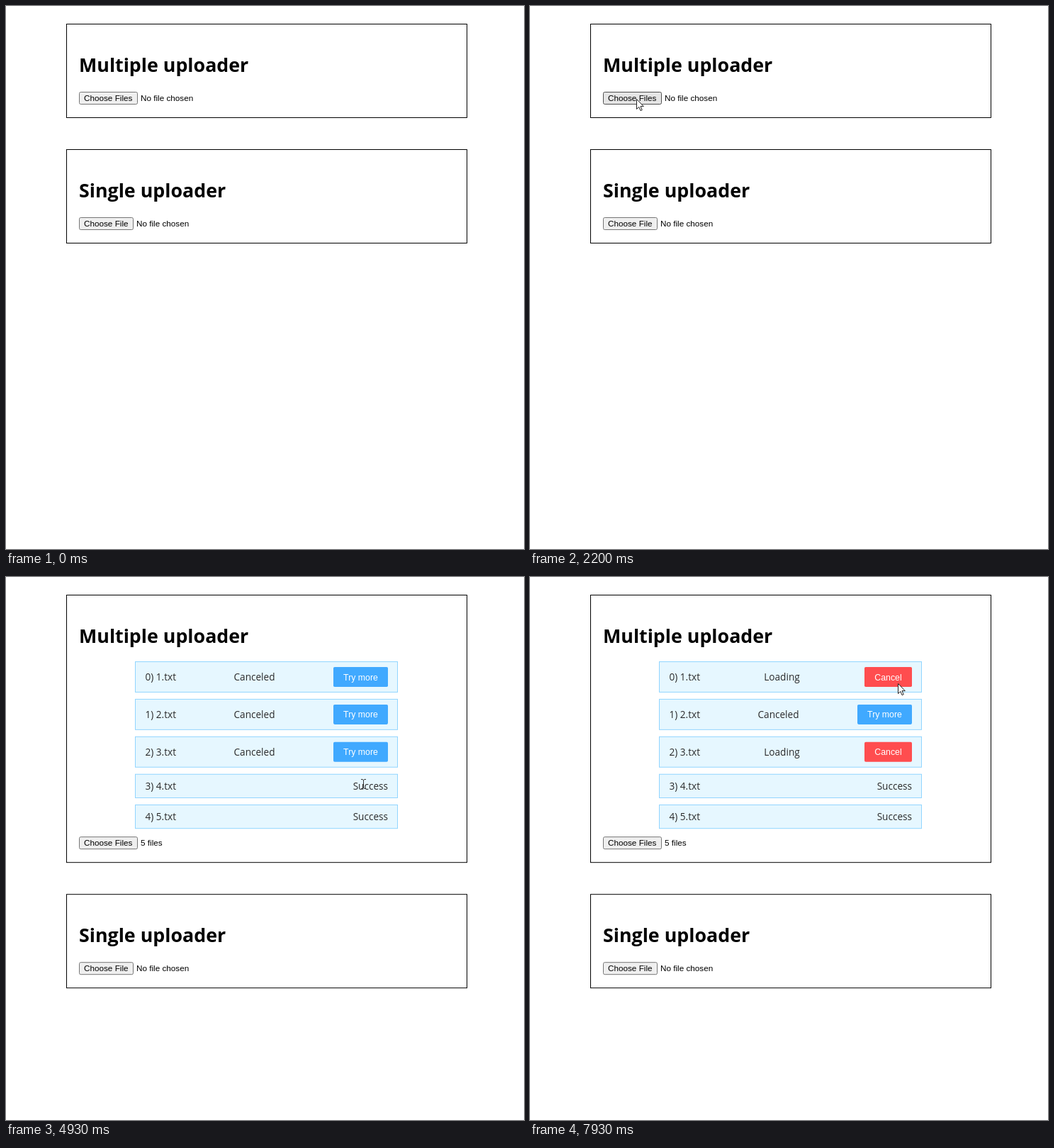
Write an HTML page that moves like this. It is 731 px wide and 766 px high and loops after 8 s.

```html
<!DOCTYPE html>
<html lang="en">
<head>
<meta charset="utf-8">
<title>File uploaders</title>
<style>
  html, body { margin: 0; width: 100%; height: 100%; overflow: hidden; background: #fff; }
  svg { display: block; width: 731px; height: 766px; font: 13.6px "Open Sans", "Noto Sans", sans-serif; fill: #2a2a2a; }
  .title { font-size: 26.8px; font-weight: 700; fill: #000; }
  .input { font: 11.73px "Liberation Sans", Arial, sans-serif; fill: #000; }
  .button { font: 12.32px "Liberation Sans", Arial, sans-serif; fill: #fff; text-anchor: middle; }
  .tip { font-size: 10.8px; fill: #1c3fc4; }
  .label { font-size: 9px; font-weight: 700; fill: #aaa; text-anchor: middle; }
</style>
</head>
<body>
<svg id="stage" viewBox="0 0 731 766"></svg>
<script>
const LOOP = 8000, STEP = 1000 / 15;
const ENTER = 1270, OVER = 1730, DROP = 2070, LISTED = 2870, DONE = 4870, LEAVE_TEXT = 5600;
const FILES = [0, 1, 2, 3, 4];
const SCALE = .882;   // page zoom, sets the list spacing

// Pointer moves: start, end, and the place reached; it rests in between
const entry = [640, 220];
const moves = [
  [1200, 1600, 191, 149], [1600, 1870, 138, 122], [2070, 2200, 150, 131],
  [2870, 3730, 510, 236], [3930, 4130, 500, 151], [4330, 4730, 504, 283],
  [4800, 5330, 505, 343], [5400, 5600, 504, 296], [5600, 6270, 508, 189],
  [6270, 6470, 504, 174], [6670, 6930, 507, 188], [7000, 7530, 517, 147],
  [7730, 7930, 519, 150]
];
// When each of the first files is canceled and retried
const canceled = [[4200, 7800], [4070, Infinity], [3930, 5930]];

const rect = (x, y, w, h, attrs) => `<rect x="${x}" y="${y}" width="${w}" height="${h}" ${attrs}/>`;
const text = (x, y, str, attrs = '') => `<text x="${x}" y="${y}" ${attrs}>${str}</text>`;

function pointerAt(t) {
  let [x, y] = entry;
  for (const [from, to, toX, toY] of moves) {
    const k = Math.max(0, Math.min(1, (t - from) / (to - from)));
    const eased = k * k * (3 - 2 * k);
    x += (toX - x) * eased;
    y += (toY - y) * eased;
  }
  return [Math.round(x), Math.round(y)];
}

function fileInput(y, caption, width, status, hover) {
  const look = hover ? 'fill="#e5e5e5" stroke="#4f4f4f"' : 'fill="#efefef" stroke="#767676"';
  return rect(103.5, y + .5, width - 1, 17, `rx="2" ${look}`) +
    text(110, y + 13, caption, 'class="input"') +
    text(107 + width, y + 13, status, 'class="input"');
}

function panel(y, height, title) {
  return rect(85.5, y + .5, 565, height, 'fill="#fff" stroke="#000"') +
    text(103, y + 68, title, 'class="title"');
}

function button(y, caption, width, color) {
  return rect(539 - width, y, width, 28, `rx="1.8" fill="${color}"`) +
    text(539 - width / 2, y + 18.5, caption, 'class="button"');
}

const isDone = (i, t) => i > 2 && t >= DONE;
const isCanceled = (i, t) => i < 3 && t >= canceled[i][0] && t < canceled[i][1];
const pitch = (i, t) => (isDone(i, t) ? 49 : 60) * SCALE;
const listHeight = (n, t) => FILES.slice(0, n).reduce((sum, i) => sum + pitch(i, t), 0);

function fileRow(i, t) {
  const y = 119 + listHeight(i, t);
  const height = pitch(i, t) - 10;
  const base = y + height / 2 + 5.7;
  const out = rect(182.5, y + .5, 370, height, 'fill="#e6f7ff" stroke="#91d5ff"') +
    text(196.5, base, `${i}) ${i + 1}.txt`);
  if (isDone(i, t)) return out + text(539, base, 'Success', 'text-anchor="end"');
  const [status, x, action, width, color] = isCanceled(i, t)
    ? ['Canceled', 350.5, 'Try more', 77, '#40a9ff']
    : ['Loading', 355.5, 'Cancel', 67, '#ff4d4f'];
  return out + text(x, base, status, 'text-anchor="middle"') + button(y + 8, action, width, color);
}

function dragImage() {
  let lines = '';
  for (let y = 7; y < 34; y += 3) lines += `M4 ${y}H${y < 10 ? 18 : 25}`;
  return FILES.map(i =>
    `<g transform="translate(${i * 67 - .5} -12.5)" opacity="${Math.max(0, .6 - i * .18)}">
      <path d="M0 0H20L28 8V36H0Z" fill="#f7f7f7" stroke="#999"/>
      <path d="M20 0V8H28" fill="#fff" stroke="#999"/>
      <path d="${lines}" stroke="#aaa"/>
      <g opacity=".5">${text(14, 52, i + 1 + '.txt', 'class="label"')}</g>
    </g>`).join('');
}

function copyTip() {
  return rect(22.5, 14.5, 48, 17, 'fill="#fff" stroke="#777"') +
    '<path d="M27 23h8M31 19v8" stroke="#1c3fc4" stroke-width="2"/>' +
    text(39.5, 27, 'Copy', 'class="tip"');
}

function pointer(t) {
  if (t < ENTER) return '';
  const shape = t >= DONE && t <= LEAVE_TEXT
    ? '<path d="M-3 -6.5H-1L.5 -5.5 2 -6.5H4M.5 -5.5V5.5M-3 6.5H-1L.5 5.5 2 6.5H4" fill="none" stroke="#333"/>'
    : '<path d="M.5 .5V14.5L3.8 11.4 6 16.6 8.2 15.7 6 10.6H10.3Z" fill="#fff" stroke="#222"/>';
  const drag = t < DROP ? dragImage() + copyTip() : '';
  return `<g transform="translate(${pointerAt(t)})">${drag}${shape}</g>`;
}

function scene(t) {
  const listed = t >= LISTED;
  const shift = listed ? listHeight(FILES.length, t) : 0;
  return panel(25, 132 + shift, 'Multiple uploader') +
    (listed ? FILES.map(i => fileRow(i, t)).join('') : '') +
    fileInput(121 + shift, 'Choose Files', 83, listed ? '5 files' : 'No file chosen', t >= OVER && !listed) +
    panel(202 + shift, 132, 'Single uploader') +
    fileInput(298 + shift, 'Choose File', 77, 'No file chosen') +
    pointer(t);
}

const stage = document.getElementById('stage');
let start, last;
function frame(now) {
  start ??= now;
  const step = Math.floor(((now - start) % LOOP + 5) / STEP);
  const t = Math.round(step * STEP / 10) * 10 % LOOP;
  if (t !== last) stage.innerHTML = scene(last = t);
  requestAnimationFrame(frame);
}
requestAnimationFrame(frame);
</script>
</body>
</html>
```
